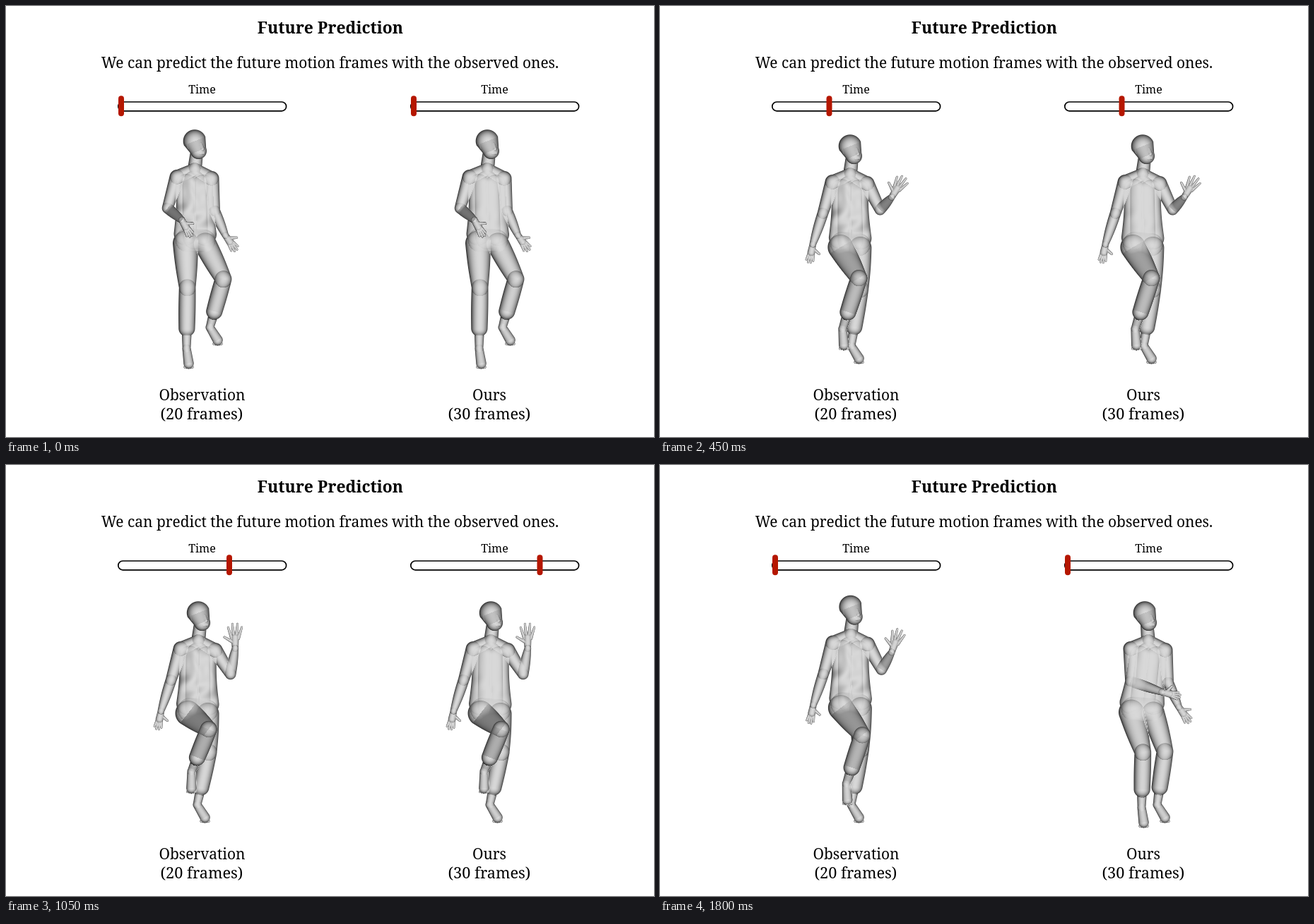
An HTML page with a canvas that plays this animation: 917 by 611 pixels, repeating every 1830 ms.

```html
<!DOCTYPE html>
<html lang="en">
<head>
<meta charset="utf-8">
<title>Future Prediction</title>
<style>
html, body { margin: 0; width: 100%; height: 100%; overflow: hidden; background: #fff; }
canvas, svg { position: absolute; left: 0; top: 0; display: block; }
text { font: 20.9px "Noto Serif", "DejaVu Serif", serif; text-anchor: middle; fill: #000; }
.title { font-size: 22.9px; font-weight: bold; }
.small { font-size: 16px; }
.count { font-size: 21.7px; }
rect { fill: #fff; stroke: #000; stroke-width: 1.7; }
line { stroke: #b51700; stroke-width: 8; stroke-linecap: round; }
</style>
</head>
<body>
<canvas id="stage" width="917" height="611"></canvas>
<svg width="917" height="611" viewBox="0 0 917 611">
  <text class="title" x="459" y="38.5">Future Prediction</text>
  <text x="458.5" y="88">We can predict the future motion frames with the observed ones.</text>
  <text class="small" x="277.5" y="124">Time</text>
  <text class="small" x="691.5" y="124">Time</text>
  <rect x="158.8" y="136" width="237.8" height="12.8" rx="6.4"/>
  <rect x="572.8" y="136" width="237.8" height="12.8" rx="6.4"/>
  <line id="knobA" y1="131.3" y2="152.3"/>
  <line id="knobB" y1="131.3" y2="152.3"/>
  <text x="277.5" y="559">Observation</text>
  <text class="count" x="277" y="586">(20 frames)</text>
  <text x="684" y="559">Ours</text>
  <text class="count" x="684" y="586">(30 frames)</text>
</svg>
<script>
const LOOP = 1830, TICK = 30, STEP = 5.1;
const X0 = 190, Y0 = 165, W = 190, H = 360, GAP = 414;

const ctx = document.getElementById('stage').getContext('2d');
const clamp = (v, lo = 0, hi = 1) => Math.min(hi, Math.max(lo, v));
const mix = (a, b, t) => a + (b - a) * t;
const lerp = (a, b, t) => a.map((v, i) => mix(v, b[i], t));
const add = (p, x, y, z = 0) => [p[0] + x, p[1] + y, p[2] + z];
// 1 at d = 0, easing down to 0 at d = width
const bump = (d, width) => 0.5 + 0.5 * Math.cos(Math.PI * clamp(Math.abs(d) / width));

// bone end: turn is measured in the picture from straight down, pitch towards the viewer
function bone(p, len, turn, pitch = 0) {
  const a = turn * Math.PI / 180, b = pitch * Math.PI / 180;
  const flat = len * Math.cos(b);
  return add(p, flat * Math.sin(a), flat * Math.cos(a), len * Math.sin(b));
}

// knee and cuff follow from hip and heel: the shorter the reach, the sharper the bend
function bendLeg(hip, heel, toe, give, forward, rise) {
  const bend = clamp((150 - Math.hypot(heel[0] - hip[0], heel[1] - hip[1])) * give, 2, 27);
  const knee = add(lerp(hip, heel, 0.42), bend, -rise, bend * forward);
  return { hip, knee, cuff: lerp(knee, heel, 0.67), heel, toe };
}

// one marching step: left knee and right arm rise together, then a crouch
function poseAt(n) {
  const lift = bump(n - 13.5, n < 13.5 ? 14 : 16);
  const back = bump(n, 6);
  const crouch = bump(29 - n, 9);
  const fold = Math.sqrt(crouch);
  const wave = Math.sin(lift * Math.PI / 2);
  const high = lift * lift;

  const neck = [266.5 + 6.5 * high + 10 * crouch, 231 + 23 * high + 18 * crouch, 0];
  const head = add(neck, -5 * crouch, -40);
  const sl = add(neck, -25, 11), sr = add(neck, 24, 13);
  const hl = add(neck, -13 - 2 * high - 11 * crouch, 105 - 3 * lift - 4 * crouch);
  const hr = add(hl, 28 + 3 * crouch, 1);

  const elbowL = bone(sl, 46, -17 + 17 * crouch);
  const turnL = -18 + 68 * back + 89 * fold;
  const wristL = bone(elbowL, 46 + 8 * crouch, turnL, 55 * back + 30 * fold);
  const tipL = bone(wristL, 27, turnL * 0.6 + 34 * crouch, 10 * (back + crouch));

  const elbowR = bone(sr, 46 - 6 * wave, 5 + 28 * wave);
  const turnR = 23 + 149 * wave;
  const wristR = bone(elbowR, 38, turnR, 62 * Math.sqrt(Math.sin(Math.PI * wave) + 1e-9));
  const tipR = bone(wristR, 27 + 9 * wave, turnR + 11, 8);

  const heelL = [255 + 12 * n / 29, 485 - 60 * Math.pow(lift, 1.3), 2];
  const heelR = [270 + 18 * back + 19 * crouch, 481 - 26 * back, -7 + 4 * crouch];
  return {
    head, neck, sl, sr, hl, hr,
    armL: { shoulder: sl, elbow: elbowL, wrist: wristL, tip: tipL, spread: 0.14 },
    armR: { shoulder: sr, elbow: elbowR, wrist: wristR, tip: tipR, spread: 0.16 + 0.05 * wave },
    legL: bendLeg(hl, heelL, add(heelL, 3 - 4 * high, 21 + 3 * lift, 6), 0.72, 1.7, 15 * high),
    legR: bendLeg(hr, heelR, add(heelR, 11, 18, 6), 0.72 - 0.4 * lift, 0.7, 0)
  };
}

// height, slope and coverage of the visible surface
const [hgt, sx, sy, cover] = [0, 0, 0, 0].map(() => new Float32Array(W * H));
const image = ctx.createImageData(W, H);

function limb(a, b, ra, rb, { bulge = 0, flat = 1, soft = 5, fold = 0, at = a } = {}) {
  const dx = b[0] - a[0], dy = b[1] - a[1], dz = b[2] - a[2];
  const len2 = dx * dx + dy * dy + 1e-6;
  const pad = Math.max(ra, rb) + Math.abs(bulge) + 1;
  const left = Math.max(X0, Math.floor(Math.min(a[0], b[0]) - pad));
  const right = Math.min(X0 + W - 1, Math.ceil(Math.max(a[0], b[0]) + pad));
  const top = Math.max(Y0, Math.floor(Math.min(a[1], b[1]) - pad));
  const base = Math.min(Y0 + H - 1, Math.ceil(Math.max(a[1], b[1]) + pad));
  for (let y = top; y <= base; y++) for (let x = left; x <= right; x++) {
    const t = clamp(((x - a[0]) * dx + (y - a[1]) * dy) / len2);
    const r = mix(ra, rb, t) + bulge * Math.sin(Math.PI * t);
    const ex = x - a[0] - dx * t, ey = y - a[1] - dy * t;
    const d2 = ex * ex + ey * ey;
    const c = clamp(r - Math.sqrt(d2) + 0.5);
    if (!c) continue;
    const s = Math.sqrt(Math.max(r * r - d2, r * r * 0.06));
    const z = a[2] + dz * t + flat * s;
    const slope = t > 0 && t < 1 ? dz / len2 : 0;
    let gx = slope * dx - flat * ex / s, gy = slope * dy - flat * ey / s;
    if (fold) {
      const u = x - at[0], v = y - at[1];
      const ripple = Math.sin(0.2 * u + 0.11 * v + 1.8 * Math.sin(0.09 * v - 0.06 * u));
      gx += fold * ripple;
      gy += fold * 0.7 * Math.sin(0.16 * v - 0.1 * u + ripple);
    }
    const i = (y - Y0) * W + x - X0;
    if (!cover[i]) {
      hgt[i] = z; sx[i] = gx; sy[i] = gy; cover[i] = c;
      continue;
    }
    const w = clamp(0.5 + 0.5 * (z - hgt[i]) / soft) * c;
    hgt[i] = mix(hgt[i], z, w) + soft * w * (1 - w) * 0.5;
    sx[i] = mix(sx[i], gx, w);
    sy[i] = mix(sy[i], gy, w);
    cover[i] = Math.max(cover[i], c);
  }
}

function hand(wrist, tip, spread) {
  const dx = tip[0] - wrist[0], dy = tip[1] - wrist[1];
  const ray = (angle, k) => {
    const c = Math.cos(angle) * k, s = Math.sin(angle) * k;
    return add(wrist, dx * c - dy * s, dx * s + dy * c, (tip[2] - wrist[2]) * k);
  };
  limb(wrist, ray(0, 0.45), 4.6, 5.4, { flat: 0.8 });
  for (let f = -1.5; f <= 1.5; f++)
    limb(ray(f * spread, 0.42), ray(f * spread, 1 - 0.05 * f * f), 2.3, 1.4, { soft: 1 });
  limb(ray(0, 0.2), ray(-0.75, 0.62), 2.6, 1.6, { soft: 1.5 });
}

function arm({ shoulder, elbow, wrist, tip, spread }) {
  limb(shoulder, elbow, 10.5, 7.8, { soft: 9 });
  limb(elbow, wrist, 7.8, 4.8, { bulge: 0.8, soft: 7 });
  hand(wrist, tip, spread);
}

function leg({ hip, knee, cuff, heel, toe }, size) {
  limb(hip, knee, size, 11.8, { bulge: 0.8, flat: 0.9, soft: 15 });
  limb(knee, cuff, 11.8, 11.6, { bulge: 0.4, soft: 12 });
  limb(cuff, heel, 7.2, 5.8, { soft: 2 });
  limb(heel, toe, 6, 7.2, { flat: 0.9 });
  for (let i = -2; i <= 2; i++)
    limb(add(toe, i * 2.4, 3, 1), add(toe, i * 2.8, 7 - Math.abs(i) * 0.6), 1.8, 1.4, { soft: 2 });
}

function face(h, neck) {
  limb(add(h, 3, 15, -4), add(neck, 0, 0, -2), 9, 10, { soft: 6 });
  limb(h, add(h, 5.5, 14, 7), 16.3, 11.5);
  limb(add(h, 9, 4, 12), add(h, 11, 11, 16), 2, 2.8, { soft: 3 });
  limb(add(h, 8, 18, 15), add(h, 13, 17, 14), 1.6, 1.6, { soft: 3 });
  limb(add(h, -10, 5, 7), add(h, -9, 10, 7), 2.4, 1.8, { soft: 3 });
}

function torso({ neck, sl, sr, hl, hr }, fold) {
  const cloth = { flat: 0.75, soft: 12, fold, at: neck };
  for (const s of [sl, sr]) limb(add(neck, 0, -1), s, 8, 9.8, { soft: 8 });
  const side = (k, hip, r) =>
    limb(add(lerp(sl, sr, k), 0, 9), add(hip, 0, -14), 14, r, { ...cloth, bulge: -1.5 });
  side(0.26, hl, 16.5);
  side(0.75, hr, 16);
  limb(add(lerp(sl, sr, 0.5), 0, 7), add(lerp(hl, hr, 0.5), 0, -10), 17, 18, cloth);
  limb(add(hl, 3, -5), add(hr, -2, -5), 17, 16, cloth);
}

function figure(p, x, fold) {
  cover.fill(0);
  torso(p, fold);
  leg(p.legR, 16);
  leg(p.legL, 18);
  arm(p.armR);
  arm(p.armL);
  face(p.head, p.neck);
  const px = image.data;
  for (let i = 0; i < W * H; i++) {
    const nz = 1 / Math.sqrt(1 + sx[i] * sx[i] + sy[i] * sy[i]);
    const lit = clamp(nz - 0.06 * sx[i] * nz);
    const gray = mix(255, 18 + 198 * Math.pow(lit, 1.15), cover[i]);
    px[i * 4] = px[i * 4 + 1] = px[i * 4 + 2] = gray;
    px[i * 4 + 3] = 255;
  }
  ctx.putImageData(image, X0 + x, Y0);
}

function knob(id, x) {
  const el = document.getElementById(id);
  el.setAttribute('x1', x);
  el.setAttribute('x2', x);
}

// the bodies move every second tick, with a short hold near the end
function bodyStep(t) {
  const late = t >= 1650 ? 30 : 0;
  return Math.min(29, Math.floor((t - late) / 60));
}

let shownTick = -1, shownBody = -1;
function draw(t) {
  const tick = Math.floor(t / TICK);
  if (tick === shownTick) return;
  shownTick = tick;
  const pos = t >= 1800 ? 0 : tick;
  knob('knobA', 163 + STEP * Math.min(pos, 30));
  knob('knobB', 577 + STEP * Math.min(pos, 45));
  const n = bodyStep(t);
  if (n === shownBody) return;
  shownBody = n;
  figure(poseAt(Math.min(n, 20)), 0, 0.26);
  figure(poseAt(n), GAP, 0.06);
}

const start = performance.now();
function loop() {
  draw((performance.now() - start) % LOOP);
  requestAnimationFrame(loop);
}
draw(0);
requestAnimationFrame(loop);
</script>
</body>
</html>
```
